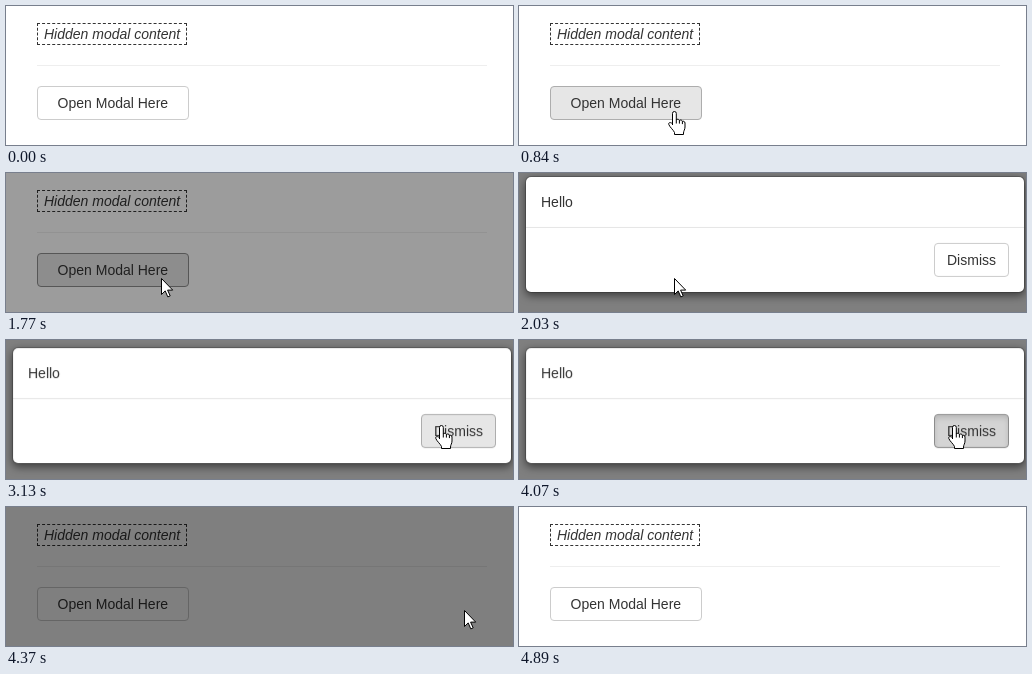
Write an HTML page that moves like this. It is 507x139 px and loops after 4.97 s.

```html
<!DOCTYPE html>
<html lang="en">
<head>
<meta charset="utf-8">
<title>Modal demo</title>
<style>
  * { box-sizing: border-box; }
  html, body { margin: 0; width: 100%; height: 100%; overflow: hidden; background: #fff; }
  body { position: relative; font: 14px/20px "Liberation Sans", Arial, sans-serif; color: #333; white-space: nowrap; }
  body > * { position: absolute; }
  #note { left: 31px; top: 17px; padding: 0 6px; border: 1px dashed #333; font-style: italic; }
  #rule { left: 31px; top: 59px; width: 450px; height: 1px; background: #eee; }
  .btn { display: inline-block; height: 34px; padding: 6px 12px; border: 1px solid #ccc; border-radius: 4px; background: #fff; }
  .focus { background: #e6e6e6; border-color: #8c8c8c; }
  .hover { background: #e6e6e6; border-color: #adadad; }
  .active { background: #d4d4d4; border-color: #8c8c8c; box-shadow: inset 0 3px 5px rgba(0, 0, 0, .125); }
  #open { left: 31px; top: 80px; padding: 6px 19.6px; }
  #backdrop { inset: 0; background: #000; }
  #modal { left: 6px; top: 7px; width: 500px; height: 117px; border: 1px solid rgba(0, 0, 0, .2); border-radius: 6px;
    background: #fff; background-clip: padding-box; box-shadow: 0 3px 9px rgba(0, 0, 0, .5); will-change: transform, opacity; }
  #text { padding: 15px; }
  #footer { padding: 15px; border-top: 1px solid #e5e5e5; text-align: right; }
  #cursor { left: 0; top: 0; width: 20px; height: 26px; overflow: visible; fill: #fff; stroke: #000; stroke-linejoin: round; }
</style>
</head>
<body>
<div id="note">Hidden modal content</div>
<div id="rule"></div>
<div id="open" class="btn">Open Modal Here</div>
<div id="backdrop"></div>
<div id="modal">
  <div id="text">Hello</div>
  <div id="footer"><span id="dismiss" class="btn">Dismiss</span></div>
</div>
<svg id="cursor">
  <path id="arrow" d="M.5.5v16l3.7-3.6 2.6 6 2.4-1-2.6-5.8h5.1z"/>
  <g id="hand" transform="translate(-6 0)">
    <path d="M4.5 14V2.4a1.9 1.9 0 0 1 3.8 0V9c0-1.2 3.1-1 3.1.6c.3-1 3-.8 3 1c.4-.8 2.6-.4 2.6 1.4V16c0 2.5-1.5 4-1.5 6v1.5h-9v-2C5.5 19 2 16.5.8 13.5c-.8-2 2-2.8 3.7-.5z"/>
    <path fill="none" d="M8.3 9v3.5M11.4 9.6v3M14.4 10.6v2.5"/>
  </g>
</svg>
<script>
const LOOP = 4970;
const STEP = 78, LEAD = 24;
const OPEN_PRESS = 1638, BACKDROP_IN = 1677, MODAL_IN = 1822;
const DISMISS_PRESS = 4056, MODAL_OUT = 4160, BACKDROP_OUT = 4447, BLUR = 4914;
const ENTRY = { x: 408, y: 140 };
const MOVES = [
  { start: 390, end: 858, x: 155, y: 105 },
  { start: 2590, end: 2964, x: 400, y: 68 },
  { start: 2964, end: 3120, x: 435, y: 85 },
  { start: 4290, end: 4680, x: 507, y: 142 },
];

const $ = id => document.getElementById(id);
const progress = (t, start, length) => Math.min(1, Math.max(0, (t - start) / length));
const easeOut = p => 1 - (1 - p) ** 1.7;
const between = (t, a, b) => t >= a && t < b;

function pointer(t) {
  let { x, y } = ENTRY;
  for (const move of MOVES) {
    const p = easeOut(progress(t, move.start, move.end - move.start));
    x += (move.x - x) * p;
    y += (move.y - y) * p;
  }
  return [Math.round(x), Math.round(y)];
}

function draw(time) {
  const t = Math.floor((time + LEAD) / STEP) * STEP;
  const [x, y] = pointer(t);

  const shade = progress(t, BACKDROP_IN, 150) - progress(t, BACKDROP_OUT, 150);
  const visible = progress(t, MODAL_IN, 150) - progress(t, MODAL_OUT, 150);
  const settled = easeOut(progress(t, MODAL_IN, 300)) - easeOut(progress(t, MODAL_OUT, 300));
  $('backdrop').style.opacity = shade / 2;
  $('modal').style.opacity = visible;
  $('modal').style.transform = `translateY(${-25 * (1 - settled)}%)`;

  const overOpen = t < BACKDROP_IN && between(x, 31, 183) && between(y, 80, 114);
  const overDismiss = visible > 0 && between(x, 415, 490) && between(y, 74, 108);
  const openFocused = between(t, BACKDROP_IN, MODAL_IN + 300) || between(t, BACKDROP_OUT + 150, BLUR);
  const openState = between(t, OPEN_PRESS, BACKDROP_IN) ? 'active' : openFocused ? 'focus' : overOpen ? 'hover' : '';
  const dismissState = between(t, DISMISS_PRESS, DISMISS_PRESS + STEP) ? 'active' : overDismiss ? 'hover' : '';
  $('open').className = 'btn ' + openState;
  $('dismiss').className = 'btn ' + dismissState;

  const hand = overOpen || overDismiss;
  $('hand').style.display = hand ? '' : 'none';
  $('arrow').style.display = hand ? 'none' : '';
  $('cursor').style.transform = `translate(${x}px, ${y}px)`;
}

const start = performance.now();
function loop() {
  draw((performance.now() - start) % LOOP);
  requestAnimationFrame(loop);
}
loop();
</script>
</body>
</html>
```
